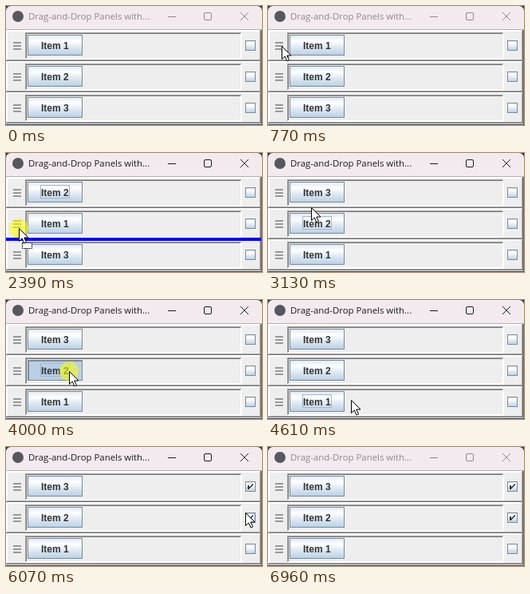
An HTML page with a canvas that plays this animation: 321x149 px, repeating every 7.03 s.

```html
<!DOCTYPE html>
<html lang="en">
<head>
<meta charset="utf-8">
<title>Drag-and-Drop Panels</title>
<style>
  html, body { margin: 0; width: 100%; height: 100%; overflow: hidden; }
  canvas { display: block; }
</style>
</head>
<body>
<canvas id="stage" width="321" height="149"></canvas>
<script>
const ctx = document.getElementById('stage').getContext('2d');
const LOOP = 7030, TOP = 30, ROW = 39;
const SETTLE = 150;    // pause between arriving and pressing
const DRAG_DELAY = 70; // press time before a drag begins
const DROP_PAUSE = 230;
const WHITE = '#fff', FACE = '#eee', SHADE = '#a6a6a6', DARK = '#747474';
const STEEL = '#7a8a99', SELECT = '#b8cfe5', INK = '#333';

// What the user does; pointer, focus, order and check marks all follow from it.
// "bow" bends the way to the gesture, "rest" delays leaving it.
const gestures = [
  { kind: 'drag', row: 0, gap: 2, at: [17, 50], to: [18, 104], down: 900, up: 1640 },
  { kind: 'drag', row: 2, gap: 0, at: [16, 128], to: [16, 40], down: 2100, up: 2920 },
  { kind: 'button', row: 0, at: [79, 50], down: 3440, up: 3580, bow: 22 },
  { kind: 'button', row: 1, at: [79, 89], down: 4000, up: 4130 },
  { kind: 'button', row: 2, at: [79, 124], down: 4330, up: 4460 },
  { kind: 'check', row: 0, at: [308, 48], down: 5340, up: 5390, bow: 15 },
  { kind: 'check', row: 1, at: [300, 89], down: 5740, up: 5870, rest: 180 }
];
const enter = { at: [163, 118], up: 130 };
const leave = { at: [216, 135], down: 6690 + SETTLE, bow: -65 };
const stops = [enter, ...gestures, leave];

const clamp = u => Math.min(1, Math.max(0, u));
const ease = u => u * u * (3 - 2 * u);

function glide(from, to, start, end, t, bow = 0) {
  const u = clamp((t - start) / (end - start)), h = ease(u);
  return {
    x: Math.round(from[0] + (to[0] - from[0]) * h),
    y: Math.round(from[1] + (to[1] - from[1]) * h + bow * Math.sin(Math.PI * u))
  };
}

function pointerAt(t) {
  if (t < enter.up || t >= leave.down - SETTLE) return null;
  const i = stops.findIndex(s => t < (s.up ?? Infinity));
  const stop = stops[i], last = stops[i - 1];
  if (stop.to && t >= stop.down)
    return glide(stop.at, stop.to, stop.down + DRAG_DELAY, stop.up - DROP_PAUSE, t);
  return glide(last.to || last.at, stop.at, last.up + (last.rest || 0),
    stop.down - SETTLE, t, stop.bow);
}

function stateAt(t) {
  const state = {
    items: [1, 2, 3], checked: [], focus: 0,
    active: t >= gestures[0].down && t < 6960,
    pointer: pointerAt(t),
    press: gestures.find(g => t >= g.down && t < g.up)
  };
  const { items, checked, press } = state;
  state.dragging = press && press.kind === 'drag' && t >= press.down + DRAG_DELAY;
  if (state.active) state.focus = items[0];
  for (const { kind, row, gap, down, up } of gestures) {
    if (t >= down && kind === 'button') state.focus = items[row];
    if (t >= down && kind === 'check') state.focus = 0;
    if (t >= up && kind === 'check') checked[row] = true;
    if (t >= up && kind === 'drag') {
      const [moved] = items.splice(row, 1);
      items.splice(gap > row ? gap - 1 : gap, 0, moved);
      if (state.focus === moved) state.focus = items[0];
    }
  }
  return state;
}

function fill(color, x, y, w, h) {
  ctx.fillStyle = color;
  ctx.fillRect(x, y, w, h);
}

function outline(color, x, y, w, h) {
  ctx.strokeStyle = color;
  ctx.lineWidth = 1;
  ctx.strokeRect(x + .5, y + .5, w - 1, h - 1);
}

function disc(color, x, y, r) {
  ctx.fillStyle = color;
  ctx.beginPath();
  ctx.arc(x, y, r, 0, 7);
  ctx.fill();
}

function text(value, x, y, font, color) {
  ctx.font = font;
  ctx.fillStyle = color;
  ctx.fillText(value, x, y);
}

function bevel(x, y, w, h, topLeft, bottomRight) {
  for (let i = 0; i < 2; i++) {
    const iw = w - 2 * i, ih = h - 2 * i;
    fill(bottomRight[i], x + i, y + i, iw, ih);
    fill(topLeft[i], x + i, y + i, iw - 1, ih - 1);
    fill(FACE, x + i + 1, y + i + 1, iw - 2, ih - 2);
  }
}

function glossy(x, y, w, h, pressed, hover) {
  const shine = ctx.createLinearGradient(0, y, 0, y + h);
  ['#dde8f3', WHITE, '#dde8f3', SELECT].forEach((c, i) => shine.addColorStop(Math.min(1, i * .3 + (i > 2)), c));
  fill(pressed ? SELECT : shine, x, y, w, h);
  if (hover && !pressed) outline(SELECT, x + 1, y + 1, w - 2, h - 2);
  outline(STEEL, x, y, w, h);
  if (pressed) {
    fill(STEEL, x + 1, y + 1, w - 2, 1);
    fill(STEEL, x + 1, y + 1, 1, h - 2);
  }
}

function drawTitleBar(active) {
  const ink = active ? '#1b1b1b' : '#8d898c';
  fill(INK, 0, 0, 321, 10);
  ctx.fillStyle = '#f3eaf0';
  ctx.beginPath();
  ctx.roundRect(0, 0, 321, TOP, [6, 6, 0, 0]);
  ctx.fill();
  disc('#55585d', 15, 13, 7);
  text('Drag-and-Drop Panels with...', 28, 17, '11.4px "Open Sans", sans-serif', ink);
  fill(ink, 203, 13, 10, 1);
  ctx.strokeStyle = ink;
  ctx.lineWidth = 1;
  ctx.stroke(new Path2D('M250 8.5H256Q257.5 8.5 257.5 10V16Q257.5 17.5 256 17.5H250Q248.5 17.5 248.5 16V10Q248.5 8.5 250 8.5Z'));
  ctx.stroke(new Path2D('M294 8L304 18M304 8L294 18'));
}

function drawRow(row, { items, checked, focus, pointer, press, dragging }) {
  const y = TOP + ROW * row, item = items[row];
  const control = (kind, x, top, w, h) => {
    const hover = pointer && !dragging &&
      pointer.x >= x && pointer.x < x + w && pointer.y >= top && pointer.y < top + h;
    glossy(x, top, w, h, press && press.kind === kind && press.row === row, hover);
  };
  bevel(0, y, 320, ROW, [WHITE, WHITE], [DARK, SHADE]);
  for (let i = 0; i < 3; i++) fill('#444', 9, y + 15.5 + 4 * i, 10, 1);

  bevel(24, y + 3, 272, 34, [SHADE, DARK], [WHITE, WHITE]);
  control('button', 27, y + 6, 69, 26);
  text('Item ' + item, 44, y + 24, 'bold 12px "Liberation Sans", sans-serif', INK);
  if (focus === item) outline('#a3b8cc', 43, y + 10, 37, 17);

  control('check', 300, y + 13, 13, 13);
  if (checked[row]) {
    fill(INK, 303, y + 18, 2, 5);
    for (let i = 0; i < 5; i++) fill(INK, 305 + i, y + 20 - i, 1, 2);
  }
}

function drawDropLine(pointer) {
  const y = TOP + ROW * Math.round((pointer.y - TOP) / ROW);
  fill('#00f', 0, Math.max(TOP, y - 2), 320, y > TOP ? 4 : 2);
}

function drawPointer({ x, y }, pressed, dragging) {
  if (pressed) disc('rgba(255,255,0,.55)', x, y, 12);
  if (dragging) {
    fill(WHITE, x + 4, y + 18, 13, 8);
    ctx.setLineDash([2, 1]);
    outline('#000', x + 4, y + 18, 13, 8);
    ctx.setLineDash([]);
  }
  const arrow = new Path2D('M0 0V16L3.7 12.5L6.5 18.5L9 17.4L6.3 11.5H11.5Z');
  ctx.save();
  ctx.translate(x + .5, y + .5);
  ctx.fillStyle = WHITE;
  ctx.fill(arrow);
  ctx.strokeStyle = '#000';
  ctx.lineWidth = 1;
  ctx.stroke(arrow);
  ctx.restore();
}

function draw(t) {
  const state = stateAt(t), { pointer, press, dragging } = state;
  fill(FACE, 0, 0, 321, 149);
  drawTitleBar(state.active);
  fill('#b4b0b2', 0, TOP - 1, 321, 1);
  for (let row = 0; row < 3; row++) drawRow(row, state);
  fill(DARK, 320, TOP, 1, 119);
  fill('#3a3f47', 0, 148, 321, 1);
  if (dragging) drawDropLine(pointer);
  if (pointer) drawPointer(pointer, press, dragging);
}

const start = performance.now();
function frame() {
  draw((performance.now() - start) % LOOP);
  requestAnimationFrame(frame);
}
frame();
</script>
</body>
</html>
```
